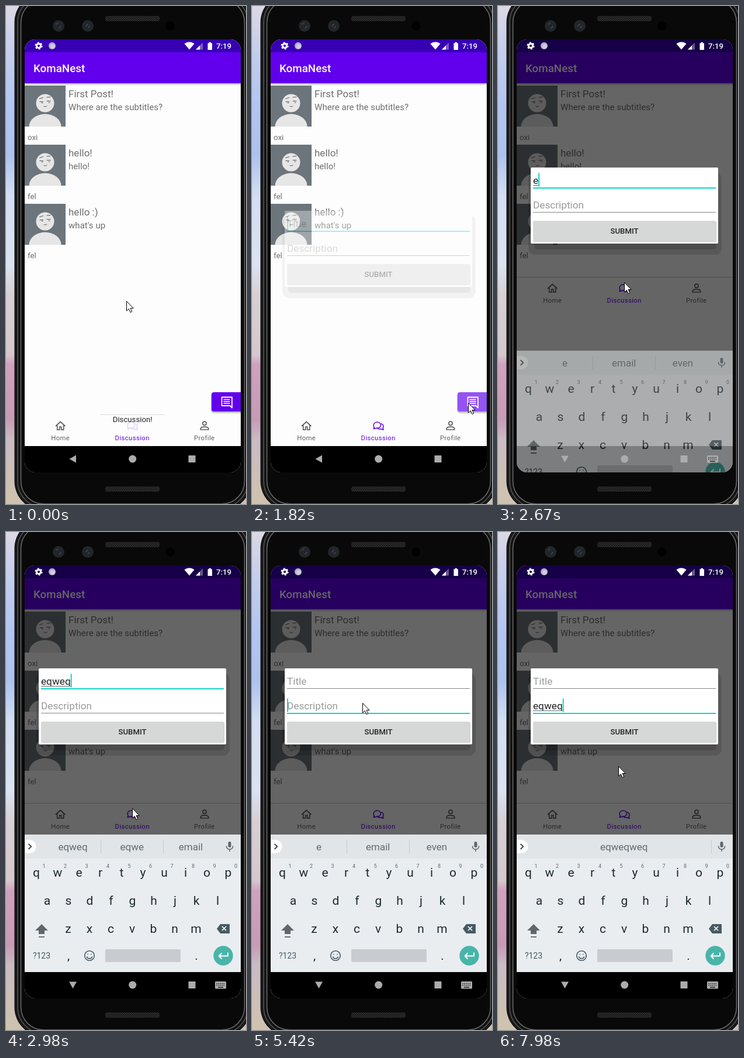
An HTML page for the animation above (8 s loop, 411x851 px).

```html
<!DOCTYPE html>
<html lang="en">
<head>
<meta charset="utf-8">
<title>Discussion screen</title>
<style>
html, body { margin: 0; width: 100%; height: 100%; overflow: hidden; background: #0b0b0b; }
svg { display: block; width: 100%; height: 100%; }
text { font-family: Roboto, sans-serif; white-space: pre; }
.mid { text-anchor: middle; }
.line { fill: none; stroke-linecap: round; stroke-linejoin: round; }
</style>
</head>
<body>
<svg viewBox="0 0 411 851" xmlns="http://www.w3.org/2000/svg">
  <defs>
    <linearGradient id="sky" x2="0" y2="1">
      <stop offset="0" stop-color="#dcd8e4"/>
      <stop offset=".1" stop-color="#c3cdec"/>
      <stop offset=".2" stop-color="#b3c5f0"/>
      <stop offset=".3" stop-color="#aec2ec"/>
      <stop offset=".38" stop-color="#d3def2"/>
      <stop offset=".52" stop-color="#dbe2f0"/>
      <stop offset=".58" stop-color="#d6d0d4"/>
      <stop offset=".7" stop-color="#d5c8cd"/>
      <stop offset=".72" stop-color="#cfa2bd"/>
      <stop offset=".83" stop-color="#c79bb5"/>
      <stop offset=".87" stop-color="#c9bcc4"/>
      <stop offset="1" stop-color="#cfc3ae"/>
    </linearGradient>
    <linearGradient id="drop" x2="0" y2="1">
      <stop offset="0" stop-opacity=".28"/>
      <stop offset="1" stop-opacity="0"/>
    </linearGradient>
    <pattern id="mesh" width="4" height="4" patternUnits="userSpaceOnUse">
      <rect width="4" height="4" fill="#2d2d2d"/>
      <path d="M0 0h2v2h-2zM2 2h2v2h-2z" fill="#191919"/>
    </pattern>
    <clipPath id="screen"><rect x="32" y="57" width="370" height="740" rx="18"/></clipPath>
    <clipPath id="face"><rect width="70" height="70"/></clipPath>
  </defs>

  <rect width="411" height="851" fill="url(#sky)"/>
  <rect x="14.500" y="-22" width="405" height="884" rx="50" fill="#090909"/>
  <g fill="none">
    <rect x="17" y="-19.500" width="400" height="879" rx="47" stroke="#1e1e1e" stroke-width="2"/>
    <rect x="20" y="-16.500" width="394" height="873" rx="44" stroke="#4c4c4c" stroke-width="2"/>
    <rect x="22.500" y="-14" width="389" height="868" rx="42" stroke="#161616" stroke-width="2"/>
    <rect x="25.500" y="-11" width="383" height="862" rx="39" stroke="#636363" stroke-width="1.800"/>
  </g>
  <rect x="170" y="17" width="93" height="9" rx="3" fill="url(#mesh)"/>
  <rect x="170" y="821" width="93" height="9" rx="3" fill="url(#mesh)"/>
  <g fill="#22262a">
    <circle cx="90" cy="34" r="10"/><circle cx="140" cy="34" r="10"/>
    <circle cx="281" cy="34" r="7.500" fill="#000"/>
  </g>
  <path class="line" d="M86 31l3-2M91 38l3-3M137 34l3-3M141 37l2-2" stroke="#444b50" stroke-width="1.500"/>

  <g clip-path="url(#screen)">
    <rect x="32" y="57" width="370" height="740" fill="#fdfdfd"/>
    <g id="rows"></g>
    <rect x="32" y="57" width="370" height="22" fill="#3700b3"/>
    <rect x="32" y="79" width="370" height="53" fill="#6200ee"/>
    <rect x="32" y="132" width="370" height="4" fill="url(#drop)"/>
    <text x="47" y="113" font-size="18.8" font-weight="500" fill="#fff">KomaNest</text>

    <g id="fab">
      <rect x="351" y="662" width="56" height="34" rx="5" opacity=".2"/>
      <rect id="fabFace" x="352" y="660" width="56" height="33" rx="4"/>
      <path d="M369.500 668.500h17.500v18l-3.500-3.500h-14z" fill="none" stroke="#fff" stroke-width="1.800" stroke-linejoin="round"/>
      <path d="M372.500 672.500h11M372.500 675.800h11M372.500 679h11" stroke="#fff" stroke-width="1.600"/>
    </g>

    <g id="nav">
      <rect x="32" y="698" width="370" height="54" fill="#fdfdfd"/>
      <path id="navEdge" d="M32 698.500h370" stroke="#c4c4c4"/>
      <g class="line" stroke="#606060" stroke-width="1.700">
        <path d="M85.500 717.500l7.700-7 7.700 7M87.700 716v8.200h4v-5h3v5h4V716"/>
        <circle cx="340" cy="713.2" r="3.1"/>
        <path d="M333.200 724v-1.500c0-4.500 13.600-4.500 13.600 0v1.500z"/>
      </g>
      <g class="line" stroke="#6200ee" stroke-width="1.500">
        <path d="M209.500 720.500l-1.500 2c2 0 3.500-.5 4.300-1.300c4.500 1 8.200-1.700 8.200-5c0-3-2.900-5.200-6.200-5.200s-6.100 2.200-6.100 5.200c0 1.600.4 3 1.300 4.300z"/>
        <path d="M221.500 714c2 .6 3.500 2.300 3.500 4.400c0 1.200-.4 2.200-1.100 3l1.300 2.600c-1.800 0-3-.5-3.900-1.200c-3 .7-5.600-.2-7-2"/>
      </g>
      <g class="mid" font-size="11.3" letter-spacing=".4" fill="#606060">
        <text x="93.2" y="742">Home</text>
        <text x="216.2" y="742" fill="#6200ee">Discussion</text>
        <text x="339.7" y="742">Profile</text>
      </g>
    </g>

    <g id="toast">
      <rect x="161" y="698" width="111" height="30" fill="#fdfdfd" opacity=".55"/>
      <path d="M207 710h19v15h-19z" fill="#fdfdfd" opacity=".6"/>
      <path d="M161 698.500h111" stroke="#ddd"/>
      <text class="mid" x="216.700" y="711" font-size="13.2" fill="#222">Discussion!</text>
    </g>

    <rect id="scrim" x="32" y="57" width="370" height="695" opacity=".6"/>

    <g id="dialog">
      <rect x="52" y="8" width="331" height="141" rx="11" opacity=".13"/>
      <rect x="62" y="20" width="312" height="120" rx="5" opacity=".14"/>
      <rect x="56" width="321" height="130" rx="2" fill="#fff"/>
      <g id="fields"></g>
      <rect x="60" y="92" width="314" height="35" rx="2" opacity=".2"/>
      <rect x="60" y="91" width="313" height="35" rx="2" fill="#d6d7d7"/>
      <text class="mid" x="216.500" y="113" font-size="13.2" font-weight="500" fill="#212121">SUBMIT</text>
    </g>

    <rect x="32" y="752" width="370" height="45"/>
    <g id="keyboard">
      <rect x="32" y="517" width="370" height="235" fill="#e9edf0"/>
      <rect x="32" y="517" width="370" height="41" fill="#e1e5e8"/>
      <path d="M32 526h8a11 11 0 0 1 0 23h-8z" fill="#fff"/>
      <path class="line" d="M39 533.500l4.300 4-4.300 4" stroke="#37474f" stroke-width="1.800"/>
      <g id="words" class="mid" font-size="17" fill="#616b70"></g>
      <g fill="#5f676c">
        <rect x="380.500" y="529" width="5" height="10" rx="2.500"/>
        <path class="line" d="M377.500 537c0 7 11 7 11 0M383 542.500v3" stroke="#5f676c" stroke-width="1.600"/>
        <path d="M61 670l11 11h-6v6h-10v-6h-6z"/>
        <rect x="56" y="691" width="10" height="1.800"/>
        <path d="M361 678l6-8h16v16h-16z" fill="#455a64"/>
      </g>
      <path d="M370 674l7 7M377 674l-7 7" stroke="#fff" stroke-width="1.700"/>
      <g id="keys" class="mid" fill="#1b2a31"></g>
      <g class="line" stroke="#455a64" stroke-width="1.600">
        <circle cx="143" cy="724" r="8.300"/>
        <path d="M138.500 726c1.500 4 7.500 4 9 0M140 721.500v.3M146 721.500v.3"/>
      </g>
      <rect x="170" y="713" width="129" height="22" rx="2" fill="#c8ccd0"/>
      <circle cx="372" cy="724" r="16.700" fill="#48b5a9"/>
      <path class="line" d="M380 719.500v5h-15M369 720l-4.300 4.500 4.300 4.500" stroke="#fff" stroke-width="2"/>
    </g>

    <g fill="#acacac">
      <path id="back"/>
      <circle cx="216.700" cy="774" r="6.500"/>
      <rect x="312.500" y="768" width="12" height="12"/>
      <g id="imeIcon">
        <rect x="358" y="768" width="19" height="12.500" rx="1.500"/>
        <path d="M360 771.500h15M360 774.500h15" stroke="#222" stroke-width="1.500" stroke-dasharray="1.600 1.500"/>
        <path d="M363 778h9" stroke="#222" stroke-width="1.500"/>
      </g>
    </g>

    <g fill="#fff">
      <circle cx="56" cy="68" r="3.600" fill="none" stroke="#fff" stroke-width="3"/>
      <circle cx="56" cy="68" r="5.600" fill="none" stroke="#fff" stroke-width="2" stroke-dasharray="2.930"/>
      <circle cx="79" cy="68" r="6" fill="#b9b0cc"/>
      <circle cx="80" cy="69" r="3.800" fill="#d2cede"/>
      <path d="M305.500 64.500c5-4 12-4 17 0l-8.500 10z"/>
      <path d="M325 74.500l12-12v12z" opacity=".35"/>
      <path d="M325 74.500l7-7v7z"/>
      <path d="M345.500 63.500h2v-1.500h3.500v1.500h2v11.500h-7.500z"/>
      <text x="360" y="73" font-size="13.200" font-weight="500">7:19</text>
    </g>
  </g>
  <path id="mouse" d="M-.5.500v16.500l3.800-3.500 2.700 6 2.700-1.200-2.600-5.800h5z" fill="#fff" stroke="#000"/>
</svg>

<script>
const LOOP = 8000;
const $ = id => document.getElementById(id);
const show = (id, on) => $(id).setAttribute('visibility', on ? 'visible' : 'hidden');
const move = (id, x, y) => $(id).setAttribute('transform', `translate(${x} ${y})`);
const label = (x, y, s, more = '') => `<text x="${x}" y="${y}" ${more}>${s}</text>`;

// The screen refreshes in bursts: [first, last, count]
const BURSTS = [[0, 0, 1], [150, 1110, 8], [1240, 1820, 5], [1970, 2240, 3], [2370, 2370, 1],
  [2670, 2980, 3], [3430, 3430, 1], [3710, 4310, 5], [4740, 5690, 8], [5850, 6390, 5],
  [6520, 6770, 3], [6900, 7050, 2], [7520, 7520, 1], [7980, 7980, 1]];
const TICKS = BURSTS.flatMap(([a, b, n]) =>
  Array.from({ length: n }, (_, i) => n > 1 ? Math.round(a + (b - a) * i / (n - 1)) : a));

const MOUSE = [[0, 207, 504], [150, 207, 504], [1110, 371, 678], [1820, 371, 678],
  [1970, 314, 630], [2240, 217, 472], [3600, 217, 472], [4160, 208, 467], [4600, 208, 467],
  [5280, 190, 292], [5420, 190, 292], [5690, 187, 384], [6500, 187, 384], [6900, 207, 400]];

// Lengths of the typed prefix over time
const TEXT = 'eqweqweq';
const TITLE = [[0, 0], [2670, 1], [2800, 3], [2980, 5], [3710, 4], [3860, 3], [4010, 2], [4160, 1], [4310, 0]];
const BODY = [[0, 0], [5850, 1], [5980, 3], [6110, 4], [6250, 6], [6390, 7], [6520, 8], [7520, 7], [7980, 5]];
const WORDS = [[0, ['e', 'email', 'even']], [2980, ['eqweq', 'eqwe', 'email']], [3860, ['e', 'email', 'even']],
  [6110, ['eqwe', 'eqw', '']], [6390, ['eqweqwe', 'eqweqw', '']], [6650, ['', TEXT, '']]];
const FAB = [[0, '#6200ee'], [1650, '#9453f4'], [1970, '#7d30f0'], [2100, '#6200ee']];
const BLINKS = [[3430, 3710], [4740, 5150], [7050, 7520]];

const at = (keys, t) => keys.findLast(k => k[0] <= t)[1];

function glide(keys, t) {
  const i = keys.findLastIndex(k => k[0] <= t);
  const a = keys[i], b = keys[i + 1];
  if (!b) return a.slice(1);
  const p = (t - a[0]) / (b[0] - a[0]);
  return [1, 2].map(j => Math.round(a[j] + (b[j] - a[j]) * p));
}

function buildRows() {
  const posts = [['First Post!', 'Where are the subtitles?', 'oxi'], ['hello!', 'hello!', 'fel'],
    ['hello :)', "what's up", 'fel']];
  $('rows').innerHTML = posts.map(([head, body, user], i) => `
    <g transform="translate(32 ${136 + 101 * i})" fill="#6f6f6f">
      <rect width="70" height="70" fill="#6c757b"/>
      <g clip-path="url(#face)" fill="#e6e6e6"><circle cx="35" cy="30" r="15.500"/><ellipse cx="35" cy="70" rx="27.500" ry="21.500"/></g>
      <path class="line" stroke="#444" stroke-width=".9" d="M25.500 22.500l6-2M38 20l6-.5M26 27.500h5.500M38 26.500h6M29 29.500h2M41 29h2M33 35.500c2 1 4 .5 5-.5"/>
      ${label(75, 20, head, 'font-size="17"')}
      ${label(75, 41.5, body, 'font-size="15.100"')}
      ${label(5, 93, user, 'font-size="13.200"')}
    </g>`).join('');
}

function buildKeys() {
  const row = (chars, x, y) => [...chars].map((c, i) => label(x + 36.5 * i, y, c, 'font-size="21"')).join('');
  const digits = [...'1234567890'].map((d, i) =>
    label(65 + 36.5 * i, 574, d, 'font-size="9" fill="#5f676c"')).join('');
  $('keys').innerHTML = row('qwertyuiop', 52, 588.5) + row('asdfghjkl', 70.5, 636.5) + row('zxcvbnm', 106.5, 684.5) +
    row(',', 107, 731) + row('.', 326, 731) + digits + label(61, 729, '?123', 'font-size="14" fill="#455a64"');
}

function drawField(hint, n, y, focus, caret) {
  const width = n ? measure(TEXT.slice(0, n)) : 0;
  const stroke = focus ? 'stroke="#10d4c6" stroke-width="2"' : 'stroke="#858585"';
  return label(60, y + 27.5, n ? TEXT.slice(0, n) : hint, `font-size="17.2" fill="${n ? '#212121' : '#9a9a9a'}"`) +
    (n ? `<path d="M60 ${y + 30.5}h${width}" stroke="#666"/>` : '') +
    `<path d="M60 ${y + (focus ? 35 : 34.5)}h313" ${stroke}/>` +
    (focus && caret ? `<rect x="${60 + width}" y="${y + 9.5}" width="2" height="23" fill="#10d4c6"/>` : '');
}

function measure(s) {
  $('fields').innerHTML = label(0, 0, s, 'font-size="17.2"');
  return $('fields').firstChild.getComputedTextLength();
}

function drawWords(list) {
  const full = list[0] !== '';
  const edges = full ? [162.5, 269.5] : [365.5];
  $('words').innerHTML = list.map((w, i) => label([114.5, 215.7, 316.5][i], 544, w)).join('') +
    edges.map(x => `<path d="M${x} 526v23" stroke="#c3c9cc"/>`).join('');
}

function draw(now) {
  const t = TICKS.findLast(k => k <= now);
  const ime = t >= 2670, open = t >= 1970;
  const rise = t >= 2980 ? 1 : t >= 2800 ? .82 : 0;

  show('toast', t < 1240);
  show('fab', !ime);
  $('fabFace').setAttribute('fill', at(FAB, t));
  move('nav', 0, ime ? -235 : 0);
  show('navEdge', ime);
  show('scrim', open);

  show('dialog', t >= 1820);
  $('dialog').setAttribute('opacity', open ? 1 : .35);
  move('dialog', 0, ime ? Math.round(276 - 43 * rise) : 350);
  const caret = !BLINKS.some(([a, b]) => t >= a && t < b);
  const inBody = t >= 5280;
  $('fields').innerHTML = [drawField('Title', at(TITLE, t), 0, !inBody, caret),
    drawField('Description', at(BODY, t), 42, inBody, caret)].join('');

  show('keyboard', ime);
  $('keyboard').setAttribute('opacity', .53 + .47 * rise);
  move('keyboard', 0, Math.round(72 * (1 - rise)));
  drawWords(at(WORDS, t));
  show('imeIcon', ime);
  $('back').setAttribute('d', ime ? 'M108 768.500h13l-6.500 11.500z' : 'M120 767.500v13l-11.500-6.500z');

  move('mouse', ...glide(MOUSE, t));
}

buildRows();
buildKeys();
const start = performance.now();
function loop() {
  draw((performance.now() - start) % LOOP);
  requestAnimationFrame(loop);
}
loop();
</script>
</body>
</html>
```
